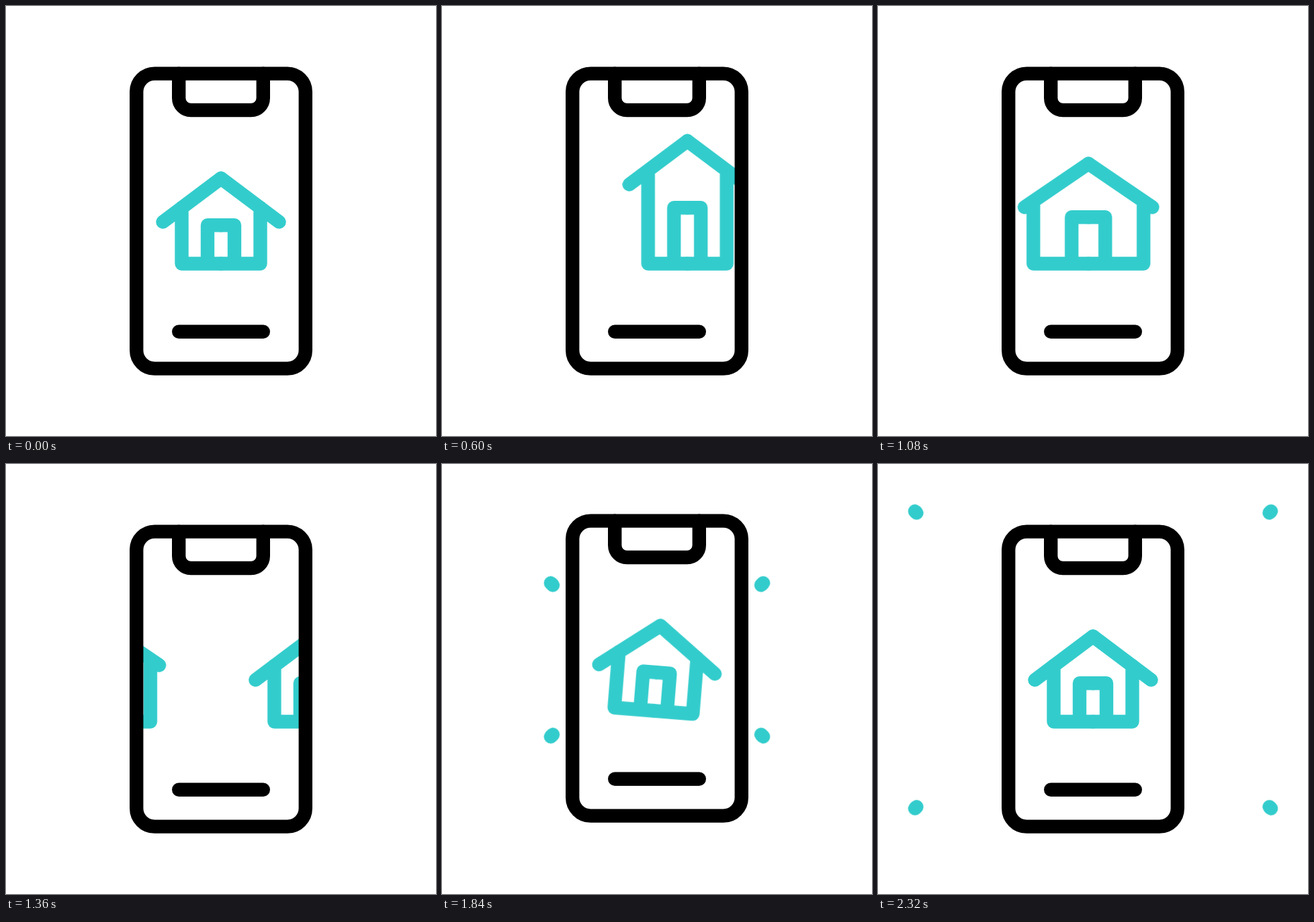
Write an HTML page without scripts that moves like this. It is 640x640 px and loops after 2.36 s.

```html
<!DOCTYPE html>
<html lang="en">
<head>
<meta charset="utf-8">
<title>Home listings on a phone</title>
<style>
  @property --head { syntax: "<length>"; inherits: true; initial-value: 0px; }
  @property --tail { syntax: "<length>"; inherits: true; initial-value: 0px; }

  html, body { margin: 0; width: 100%; height: 100%; overflow: hidden; background: #fff; }
  svg { display: block; width: 100%; height: 100%; }

  .line { fill: none; stroke: #000; stroke-width: 20.4; stroke-linecap: round; stroke-linejoin: round; }
  .teal { stroke: #33cccc; }

  .hop, .tilt, .swipe, .rays {
    animation-duration: 2.36s;
    animation-iteration-count: infinite;
    animation-timing-function: cubic-bezier(.33, 0, .67, 1);
  }
  .hop { animation-name: hop; }
  .tilt { animation-name: tilt; transform-origin: 320px 320px; }
  .swipe { animation-name: swipe; }
  .rays {
    animation-name: show, head, tail;
    stroke-dasharray: calc(var(--head) - var(--tail)) 999px;
    stroke-dashoffset: calc(-1 * var(--tail));
  }

  @keyframes hop {
    0%, 67.2% { transform: translateY(0); }
    76.2% { transform: translateY(-20px); }
    85.5% { transform: translateY(20px); }
    94.9%, 100% { transform: translateY(0); }
  }
  @keyframes tilt {
    0%, 69.5% { transform: rotate(0deg); }
    79.7% { transform: rotate(5deg); }
    95.3%, 100% { transform: rotate(0deg); }
  }
  /* speeds up until the second house leaves, then coasts to a stop */
  @keyframes swipe {
    0%, 3.4% { transform: translateX(320px); animation-timing-function: cubic-bezier(.47, 0, .667, .576); }
    32.2% { transform: translateX(-104px); animation-timing-function: cubic-bezier(.333, .455, .63, 1); }
    78%, 100% { transform: translateX(-655px); }
  }
  @keyframes show {
    0%, 76% { opacity: 0; }
    76.1%, 100% { opacity: 1; }
  }
  @keyframes head {
    0%, 76.1% { --head: 0px; }
    95.1%, 100% { --head: 155.6px; }
  }
  @keyframes tail {
    0%, 81.4% { --tail: 0px; }
    100% { --tail: 155.6px; }
  }
</style>
</head>
<body>
<svg viewBox="0 0 640 640">
  <defs>
    <clipPath id="screen"><rect x="194" y="100" width="252" height="440"/></clipPath>
    <path id="ray" d="M0 0 H160"/>

    <!-- each house is a right half and its mirror image -->
    <g id="cottage">
      <path id="cottage-half" d="M0 256.5 L86.5 321.3 M58.5 300 V383.5 H0 M20 383.5 V326.3 H0"/>
      <use href="#cottage-half" transform="scale(-1 1)"/>
    </g>
    <g id="tall">
      <path id="tall-half" d="M0 200.8 L86.5 265.6 M58.5 245 V383.5 H0 M20 383.5 V300.2 H0"/>
      <use href="#tall-half" transform="scale(-1 1)"/>
    </g>
    <g id="wide">
      <path id="wide-half" d="M0 234.6 L95.2 299.5 M82 290.5 V383.5 H0 M25 383.5 V314.3 H0"/>
      <use href="#wide-half" transform="scale(-1 1)"/>
    </g>
  </defs>

  <g class="line teal rays">
    <use href="#ray" transform="translate(165 180.3) rotate(225)"/>
    <use href="#ray" transform="translate(475 180.3) rotate(-45)"/>
    <use href="#ray" transform="translate(165 402.7) rotate(135)"/>
    <use href="#ray" transform="translate(475 402.7) rotate(45)"/>
  </g>

  <g class="line hop">
    <g clip-path="url(#screen)">
      <g class="teal tilt">
        <g class="swipe">
          <use href="#cottage"/>
          <use href="#tall" x="325"/>
          <use href="#wide" x="650"/>
          <use href="#cottage" x="975"/>
        </g>
      </g>
    </g>

    <rect x="194.2" y="100.6" width="251.6" height="439" rx="27"/>
    <path d="M257.2 100.6 V137 a18 18 0 0 0 18 18 H364.8 a18 18 0 0 0 18 -18 V100.6"/>
    <path d="M257.2 484.7 H382.8"/>
  </g>
</svg>
</body>
</html>
```
